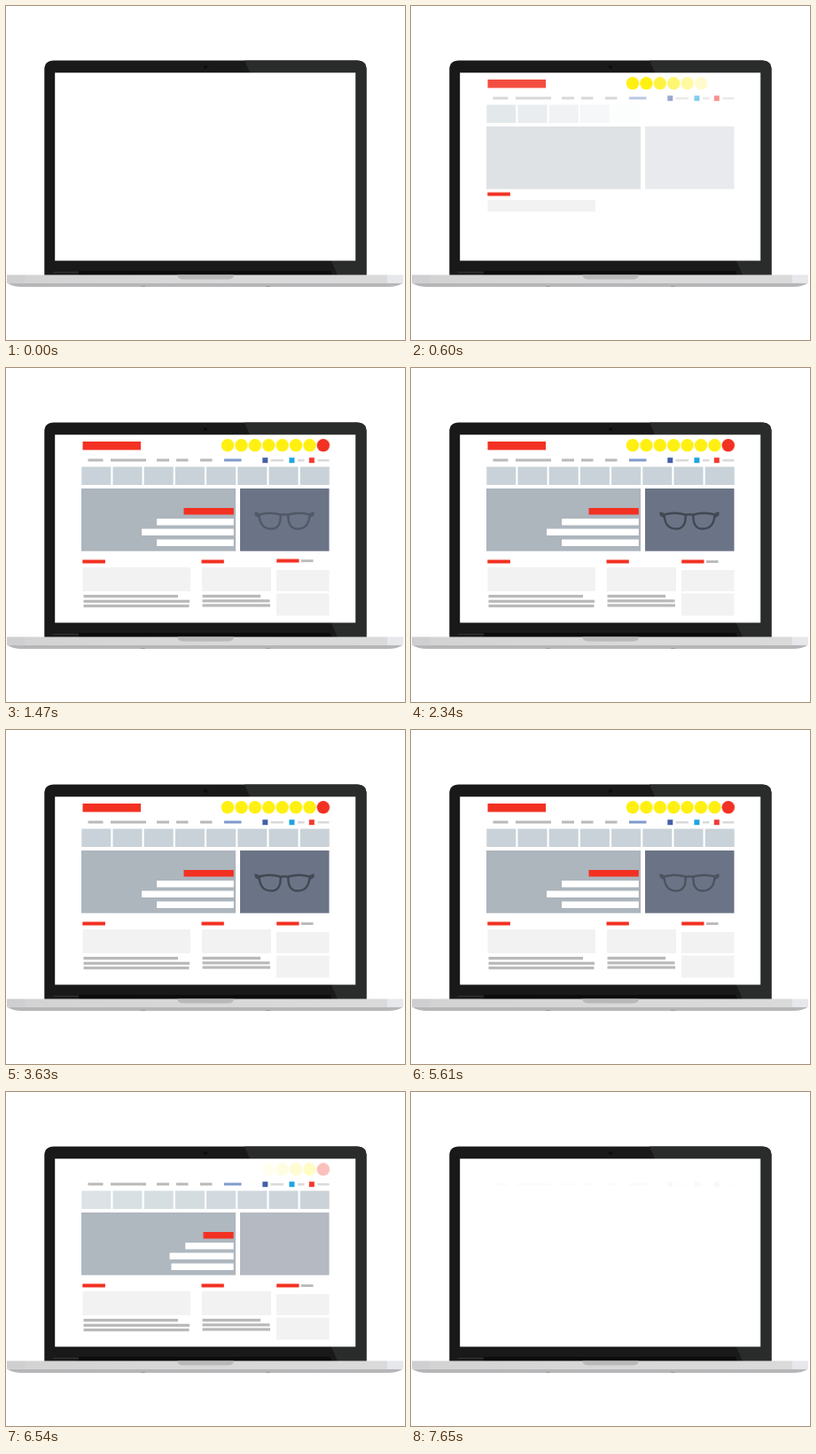
Write an HTML page without scripts that moves like this. It is 450 px wide and 377 px high and loops after 9.03 s.

```html
<!DOCTYPE html>
<html lang="en">
<head>
<meta charset="utf-8">
<title>Laptop wireframe</title>
<style>
html, body { margin: 0; width: 100%; height: 100%; overflow: hidden; background: #fff; }
svg { display: block; width: 450px; height: 377px; }

.red { fill: #f23122; }
.grey { fill: #b9b9b9; }
.pale { fill: #dadada; }
.panel { fill: #f2f2f2; }
.white { fill: #fff; }

/* One shared cycle; --d staggers the parts inside a group. */
.logo, .dots > *, .nav, .tiles > *, .left, .right, .glasses, .bars > *, .cols, .drop, .rise, .grow {
  animation: 9.03s linear var(--d, 0s) infinite backwards;
  transform-box: fill-box;
}
.logo { animation-name: logo; }
.dots > * { animation-name: dot; }
.nav { animation-name: nav; }
.tiles > * { animation-name: tile; }
.left { animation-name: left; }
.right { animation-name: right; }
.glasses { animation-name: glasses; }
.bars > * { animation-name: bar; transform-origin: right; }
.cols { animation-name: cols; }
.drop { animation-name: drop; }
.rise { animation-name: rise; transform-origin: top; }
.grow { animation-name: grow; transform-origin: left; }

.dots :nth-child(2) { --d: .05s; }
.dots :nth-child(3) { --d: .1s; }
.dots :nth-child(4) { --d: .15s; }
.dots :nth-child(5) { --d: .2s; }
.dots :nth-child(6) { --d: .25s; }
.dots :nth-child(7) { --d: .3s; }
.dots :nth-child(8) { --d: .35s; }
.tiles :nth-child(2) { --d: .04s; }
.tiles :nth-child(3) { --d: .08s; }
.tiles :nth-child(4) { --d: .12s; }
.tiles :nth-child(5) { --d: .16s; }
.tiles :nth-child(6) { --d: .2s; }
.tiles :nth-child(7) { --d: .24s; }
.tiles :nth-child(8) { --d: .28s; }
.bars :nth-child(2) { --d: .01s; }
.bars :nth-child(3) { --d: .045s; }
.bars :nth-child(4) { --d: .115s; }

@keyframes logo { 0%, 3.32%, 71.98%, 100% { opacity: 0; } 7.2%, 62.13% { opacity: 1; } }
@keyframes dot { 0%, 3.32%, 71.4%, 100% { opacity: 0; } 6.1%, 62.13% { opacity: 1; } }
@keyframes nav { 0%, 3.32% { opacity: 0; } 9.4%, 74.75% { opacity: 1; } 84.72%, 100% { opacity: .04; } }
@keyframes tile { 0%, 4.65%, 78.9%, 100% { opacity: 0; } 8.53%, 68.94% { opacity: 1; } }
@keyframes left { 0%, 4.98%, 82.39%, 100% { opacity: 0; } 9.41%, 72.1% { opacity: 1; } }
@keyframes right { 0%, 6.09%, 77.41%, 100% { opacity: 0; } 9.97%, 67.44% { opacity: 1; } }
@keyframes glasses {
  0%, 70.9%, 100% { opacity: 0; }
  13.62% { opacity: 0; animation-timing-function: cubic-bezier(.333, 1, .667, 1); }
  23.26%, 62.12% { opacity: 1; }
  62.13%, 63.12% { opacity: .75; }
}
@keyframes bar {
  0%, 74.92%, 100% { transform: scaleX(0); }
  8.34% { transform: scaleX(0); animation-timing-function: cubic-bezier(.333, 1, .667, 1); }
  13.88% { transform: none; }
  68.27% { transform: none; animation-timing-function: cubic-bezier(.333, 0, .667, .333); }
}
@keyframes cols { 0%, 72.43% { opacity: 1; } 82.39%, 100% { opacity: 0; } }
@keyframes drop {
  0% { transform: translateY(-12px); opacity: 0; }
  .01% { transform: translateY(-12px); opacity: 1; animation-timing-function: cubic-bezier(.333, 1, .667, 1); }
  5.54%, 85% { transform: none; opacity: 1; }
  85.01%, 100% { transform: none; opacity: 0; }
}
@keyframes rise {
  0% { transform: translateY(-12px) scaleY(0); animation-timing-function: cubic-bezier(.333, 1, .667, 1); }
  5.54%, 85% { transform: none; }
  85.01%, 100% { transform: scaleY(0); }
}
@keyframes grow {
  0% { transform: scaleX(0); animation-timing-function: cubic-bezier(.333, 1, .667, 1); }
  3.3%, 85% { transform: none; }
  85.01%, 100% { transform: scaleX(0); }
}
</style>
</head>
<body>
<svg viewBox="0 0 450 377">
  <defs>
    <linearGradient id="metal" x2="1">
      <stop offset="0" stop-color="#cfcfd1"/>
      <stop offset=".045" stop-color="#cfcfd1"/>
      <stop offset=".045" stop-color="#d3d3d3"/>
      <stop offset=".5" stop-color="#d8d8d8"/>
      <stop offset=".959" stop-color="#dadada"/>
      <stop offset=".959" stop-color="#e6e8ec"/>
    </linearGradient>
    <rect id="tile" y="111.500" width="33" height="20.500" fill="#c9d2d8"/>
    <circle id="dot" cy="87.300" r="7.200"/>
    <path id="lens" d="M285.500 165.500Q297 162 309.500 165.500C310.500 175 307 181.500 299 181.500C290 181.500 286 175 285.500 165.500Z"/>
  </defs>

  <!-- Laptop -->
  <path d="M43.300 304V72Q43.300 61.500 54 61.500H396Q406.500 61.500 406.500 72V304Z" fill="#191919"/>
  <path d="M269 61.500H396Q406.500 61.500 406.500 72V304H374Z" fill="#2a2b2b"/>
  <rect x="55.200" y="75.300" width="339" height="212.200" fill="#fff"/>
  <circle cx="225" cy="69" r="2" fill="#0c0c0c"/>
  <path d="M53 300.500H82" stroke="#333"/>
  <path d="M82 299H366L368 304H82Z" fill="#0c0c0c"/>
  <path d="M1 312.500H448Q441 317 431 317H18Q8 317 1 312.500Z" fill="#b6b6b9"/>
  <rect x="1" y="303.500" width="447" height="9.300" fill="url(#metal)"/>
  <path d="M193.500 303.500H256.700Q256.700 308.500 250 308.500H200.500Q193.500 308.500 193.500 303.500Z" fill="#b9b9b9"/>
  <path d="M152 316.500H157M293 316.500H298" stroke="#999"/>

  <!-- Header -->
  <rect class="logo red" x="86.500" y="83" width="65.500" height="9.500"/>
  <g class="dots" fill="#fff012">
    <use href="#dot" x="250"/><use href="#dot" x="265.400"/><use href="#dot" x="280.800"/><use href="#dot" x="296.200"/>
    <use href="#dot" x="311.600"/><use href="#dot" x="327"/><use href="#dot" x="342.400"/><use href="#dot" x="357.800" class="red"/>
  </g>
  <g class="nav">
    <path class="grey" d="M92.500 102.500h17v3h-17zM118 102.500h40v3h-40zM170 102.500h14v3h-14zM192 102.500h13.500v3h-13.500zM219 102.500h13.500v3h-13.500z"/>
    <path class="pale" d="M298.500 103h14.500v2.500h-14.500zM329 103h7.500v2.500h-7.500zM351.500 103h13v2.500h-13z"/>
    <path d="M246 102.500h19.500v3h-19.500z" fill="#7f9bcf"/>
    <path d="M289.300 101.200h6v6h-6z" fill="#4460a8"/>
    <path d="M319.400 101.200h6v6h-6z" fill="#1ea5e0"/>
    <path d="M341.800 101.200h6v6h-6z" fill="#f23a33"/>
  </g>
  <g class="tiles">
    <use href="#tile" x="85.300"/><use href="#tile" x="120.500"/><use href="#tile" x="155.700"/><use href="#tile" x="190.900"/>
    <use href="#tile" x="226.100"/><use href="#tile" x="261.300"/><use href="#tile" x="296.500"/><use href="#tile" x="331.700"/>
  </g>

  <!-- Columns -->
  <g class="cols">
    <g style="--d:.5s">
      <rect class="drop red" x="86.300" y="216.500" width="25.600" height="4"/>
      <rect class="rise panel" x="86.500" y="225" width="121.500" height="27"/>
    </g>
    <g class="grey">
      <rect class="grow" style="--d:1.02s" x="87.500" y="256" width="106.500" height="3.300"/>
      <rect class="grow" style="--d:1.07s" x="87.500" y="261.700" width="119.500" height="3.200"/>
      <rect class="grow" style="--d:1.12s" x="87.500" y="267" width="119" height="3.200"/>
    </g>
    <g style="--d:.88s">
      <rect class="drop red" x="220.500" y="216.500" width="25.300" height="4"/>
      <rect class="rise panel" x="221" y="225" width="78" height="27"/>
    </g>
    <g class="grey">
      <rect class="grow" style="--d:1.1s" x="221.500" y="255.900" width="65.500" height="3.300"/>
      <rect class="grow" style="--d:1.14s" x="221.500" y="261.300" width="76" height="3.200"/>
      <rect class="grow" style="--d:1.18s" x="221.500" y="266.400" width="76.500" height="3.200"/>
    </g>
    <g style="--d:1.18s">
      <rect class="drop red" x="305.200" y="216.500" width="25.300" height="4"/>
      <rect class="drop grey" x="333" y="217.200" width="13.500" height="2.800"/>
    </g>
    <rect class="rise panel" style="--d:1s" x="305" y="228" width="59.500" height="24"/>
    <rect class="rise panel" style="--d:1.04s" x="305" y="254.500" width="59.500" height="25"/>
  </g>

  <!-- Hero -->
  <rect class="left" x="85" y="136" width="174" height="70.700" fill="#adb5bd"/>
  <rect class="right" x="264" y="136" width="100.500" height="70.700" fill="#6b7486"/>
  <g class="bars white">
    <rect class="red" x="200.500" y="158" width="56.300" height="7.500"/>
    <rect x="170" y="170" width="86.800" height="7.500"/>
    <rect x="153" y="181.500" width="103.800" height="7.500"/>
    <rect x="170" y="193.500" width="86.800" height="7.500"/>
  </g>
  <g class="glasses" fill="none" stroke="#424853" stroke-width="2.400" stroke-linejoin="round">
    <use href="#lens"/>
    <use href="#lens" transform="matrix(-1 0 0 1 628 0)"/>
    <path d="M309.500 166Q314 164.500 318.500 166M285.500 165L281.500 163.500L282 166L285.500 168M342.500 165L346.500 163.500L346 166L342.500 168"/>
  </g>
</svg>
</body>
</html>
```
